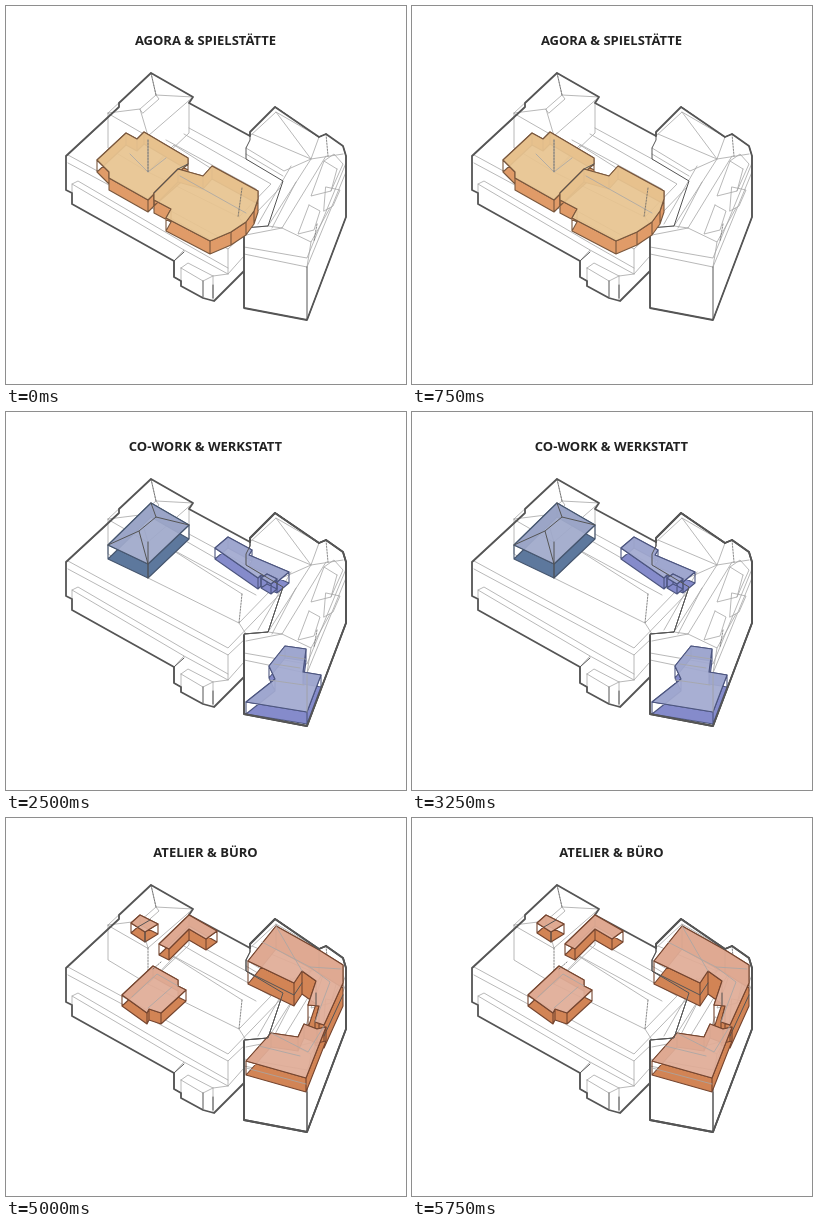
Recreate the animation shown at these times as an HTML page. Size 400 by 378 pixels, loop 6250 ms.

```html
<!DOCTYPE html>
<html lang="de">
<head>
<meta charset="utf-8">
<title>Raumprogramm</title>
<style>
  html, body { margin: 0; width: 100%; height: 100%; overflow: hidden; background: #fff; }
  svg { display: block; width: 100vw; height: 100vh; }
  text { font: 700 13px "Open Sans", "Noto Sans", sans-serif; fill: #222; text-anchor: middle; }
  path { stroke-linejoin: round; stroke-linecap: round; }
  .thin { fill: none; stroke: #a6a6a6; stroke-width: .8; }
  .dash { fill: none; stroke: #666; stroke-width: .8; stroke-dasharray: 1.5 1.5; }
  .bold { fill: none; stroke: #555; stroke-width: 1.8; }
  .mid { fill: none; stroke: #555; stroke-width: 1; }
</style>
</head>
<body>
<svg id="stage" viewBox="0 0 400 378"></svg>
<script>
const STEP = 1250;

const line = (d, cls = 'thin') => `<path class="${cls}" d="${d}"/>`;
const fill = (d, color) => `<path d="${d}" fill="${color}"/>`;
const points = s => s.split(' ').map(p => p.split(',').map(Number));
const ring = list => 'M' + list.map(p => p.join()).join('L') + 'Z';

// Extrudes one or more rings ("|" separates holes) downwards.
function prism(shape, depth, [top, side, edge], alpha = .93) {
  const rings = shape.split('|').map(points);
  let walls = '';
  for (const r of rings) {
    r.forEach(([x, y], i) => {
      const [u, v] = r[(i + 1) % r.length];
      walls += ring([[x, y], [u, v], [u, v + depth], [x, y + depth]]);
    });
  }
  const lid = rings.map(ring).join('');
  return `<g stroke="${edge}" stroke-width="1.1">
    <path d="${walls}" fill="${side}"/>
    <path d="${lid}" fill="${top}" fill-opacity="${alpha}" fill-rule="evenodd"/></g>`;
}

const hallShape = 'M113,97L145,67L187,91L183,97L244,130L277,177L240,222L238,265L208,295L197,292L175,280V275L168,271V255L66,198V187L60,184V150Z';
const wingShape = 'M269,101L244,126V134L240,142V153L277,175L262,220L238,222V302L301,314L340,211V150L337,140L320,128L313,131Z';

const hall = fill(hallShape, '#fff')
  + line('M62,149L222,236L277,179M62,157L222,243L240,226M60,150L62,149M222,243V268L238,250')
  + line('M66,187V178L72,175L178,237L222,262M66,178L178,244L168,255M178,244L222,268')
  + line('M142,166L233,211L265,178L178,128M142,166L168,139L236,182M160,134L250,183M183,122L277,173V180')
  + line('M233,211L240,222M102,112L62,149')
  + line('M236,182L233,211', 'dash');

const tower = line('M102,107L145,67L187,91L142,130ZM102,107V142L142,166L183,127V95')
  + line('M102,107L134,103L142,130M145,67L150,89L187,91M134,103L150,89L153,93L137,107Z')
  + line('M142,130V166M145,67L150,89', 'dash');

const porch = fill('M175,262L182,257L207,270V294L197,292L175,280Z', '#fff')
  + line('M175,262L182,257L207,270L222,268M175,262L197,275L207,270M175,262V280M207,270V294')
  + line('M197,275V291M207,279V292M168,255V271L175,275M168,255L178,246', 'mid');

const hallEdge = line('M244,130L183,97L187,91L145,67L113,97V101L60,150V184L66,187V198L168,255V271L175,275V280L197,292L208,295L238,265', 'bold');

const wingLines = line('M240,142L278,165L305,153L246,128M240,148L277,170M305,153L270,106L244,130M270,106L313,131L305,153L337,148')
  + line('M305,153L262,220M285,160L252,218M290,176L266,222M262,220L276,222L320,150M276,222L305,236L324,202')
  + line('M238,222L262,220M240,229L276,222M238,241L301,252L340,157M238,248L301,261L340,166M305,236L301,261')
  + line('M318,155L328,148L337,158L325,185L305,190L318,155L331,163M325,185L331,163M303,199L314,205L308,224L292,228L303,199M320,181L334,184L327,200L318,205Z')
  + line('M301,261V313', 'mid')
  + line('M320,128L322,150M311,218L308,235', 'dash');

const wing = fill(wingShape, '#fff') + wingLines;
const wingEdge = line(wingShape, 'mid')
  + line('M244,130V126L269,101L313,131L320,128L337,140L340,150V211L301,314L238,302V224', 'bold');

const house = hall + tower + porch + hallEdge + wing + wingEdge;

const ochre = ['#e8c491', '#e09b68', '#79573d'];
const sand = ['#e8cdba', '#dfad91', '#76584a'];
const blue = ['#a2a9d0', '#858bcb', '#4c557f'];
const slate = ['#a0a9cb', '#5d789d', '#46566f'];
const teal = ['#9dbfcd', '#65a1b7', '#4c5c64'];
const brick = ['#e0ad97', '#d28455', '#75452f'];

function agora() {
  return house
    + prism('91,154 120,127 131,133 138,126 182,152 182,158 148,188 142,194 103,172 103,166', 12, ochre)
    + prism('148,187 172,163 197,170 206,160 252,185 252,193 248,205 240,216 225,226 204,235 160,212 165,203 148,194', 13, ochre)
    + line('M142,134V166M124,148L142,166L160,152M174,170L240,207', 'thin')
    + line('M236,182L232,211M142,134V166', 'dash')
    + line('M148,187L172,163L182,158', 'mid');
}

function foyer() {
  const ground = fill('M57,187L35,209L288,352L302,313L170,250Z', sand[0])
    + fill('M33,212L30,215L285,361L287,355Z', sand[0])
    + fill('M28,217L23,221L281,371L284,364Z', sand[0]);
  return ground + hall + tower + hallEdge + wing
    + prism('195,149 206,140 265,171 256,181', 11, sand)
    + prism('161,222 171,215 222,242 212,250', 11, sand)
    + prism('207,222 258,176 283,184 277,204 197,275 174,262', 13, sand)
    + prism('178,221 189,213 224,232 214,241', 11, sand)
    + prism('239,162 247,154 283,174 274,184', 12, sand)
    + fill('M174,263L197,275V292L192,290V281L179,274V279L174,276Z', sand[1])
    + line('M174,263L197,275V292L192,290V281L179,274V279L174,276ZM168,255V271L174,275M168,255L178,248M207,269V293', 'mid')
    + line('M213,226L266,178M225,233L278,184M238,241L290,176M262,220L282,190M195,260L240,222')
    + line('M236,182L233,211', 'dash')
    + wingEdge;
}

function cowork() {
  return house
    + prism('102,133 145,91 183,113 142,152', 14, slate)
    + line('M102,133L133,119L142,152M133,119L150,105L183,113M150,105L145,91M142,130V166', 'mid')
    + prism('209,136 222,125 246,138 243,143 283,160 271,170 255,163 252,166', 11, blue)
    + prism('255,166 261,162 271,167 265,172', 10, blue)
    + prism('240,290 269,267 263,254 279,234 300,237 297,260 315,263 301,300', 12, blue)
    + line('M268,252L294,256M263,268L298,273M273,243L299,247M301,262V300')
    + wingEdge;
}

function rooms() {
  const court = '130,160 149,142 190,163 199,155 240,178 205,210';
  const wingTop = '240,157 269,128 313,150 337,164 338,180 299,276 239,264 241,248 265,248 287,188 275,180';
  return house
    + prism('62,175 84,184 154,219 143,229', 9, teal)
    + prism('62,162 100,170 170,211 160,217', 9, teal)
    + prism('62,149 134,76 157,88 152,95 182,111 190,104 246,139 246,148 238,151 216,139 206,149 141,113 110,105 88,127 107,138 122,130 140,141 130,160 205,210 240,182 250,172 275,185 222,236', 9, teal)
    + prism('104,138 134,111 164,128 156,136 205,153 193,162 152,142 130,160', 8, teal)
    + line('M88,130L134,88L240,147M113,142L140,119M72,149L220,229L266,184M149,142L211,180')
    + line('M102,107V142M145,67L150,92L134,103M183,96V124', 'dash')
    + prism(wingTop, 24, teal)
    + line('M239,276L299,288L339,192', 'mid')
    + `<g opacity=".65">${wingLines}</g>`
    + wingEdge
    + line('M60,150V184M62,149L134,76M239,264L299,276V300', 'mid');
}

function atelier() {
  const attic = '242,143 270,108 313,132 337,147 337,165 318,207 309,204 313,188 302,187 310,163 296,153 288,165';
  const front = '240,243 265,215 292,219 298,206 311,211 320,209 300,260';
  return house
    + prism('125,105 134,97 152,106 139,114', 10, brick)
    + line('M132,109L144,102M139,114V124', 'mid')
    + prism('153,126 183,97 211,113 200,121 183,111 163,131', 11, brick)
    + prism('116,177 147,148 172,162 172,168 180,172 155,195 143,191 141,195', 11, brick)
    + line('M126,179L151,156L172,168M142,190L166,169')
    + line('M155,144L147,151', 'dash')
    + prism(attic, 23, brick)
    + line('M242,154L288,177L296,165M310,175V187M318,218L337,177', 'mid')
    + prism(front, 14, brick)
    + line('M240,250L300,266M265,215L302,234L318,208M253,228L294,238M256,124L304,149L335,151M270,108L296,153M304,149L324,164L309,204')
    + line('M301,274V313', 'mid')
    + wingEdge;
}

const scenes = [
  ['AGORA &amp; SPIELSTÄTTE', agora],
  ['FOYER &amp; PIAZZA', foyer],
  ['CO-WORK &amp; WERKSTATT', cowork],
  ['BELEGTE RÄUME', rooms],
  ['ATELIER &amp; BÜRO', atelier]
];

const stage = document.getElementById('stage');
stage.innerHTML = scenes.map(([title, draw]) =>
  `<g display="none"><text x="199.5" y="38.5">${title}</text>${draw()}</g>`).join('');

const groups = [...stage.children];
const start = performance.now();
let shown = -1;

function tick() {
  const now = Math.floor((performance.now() - start) / STEP) % groups.length;
  if (now !== shown) {
    groups.forEach((g, i) => g.setAttribute('display', i === now ? 'inline' : 'none'));
    shown = now;
  }
  requestAnimationFrame(tick);
}
tick();
</script>
</body>
</html>
```
